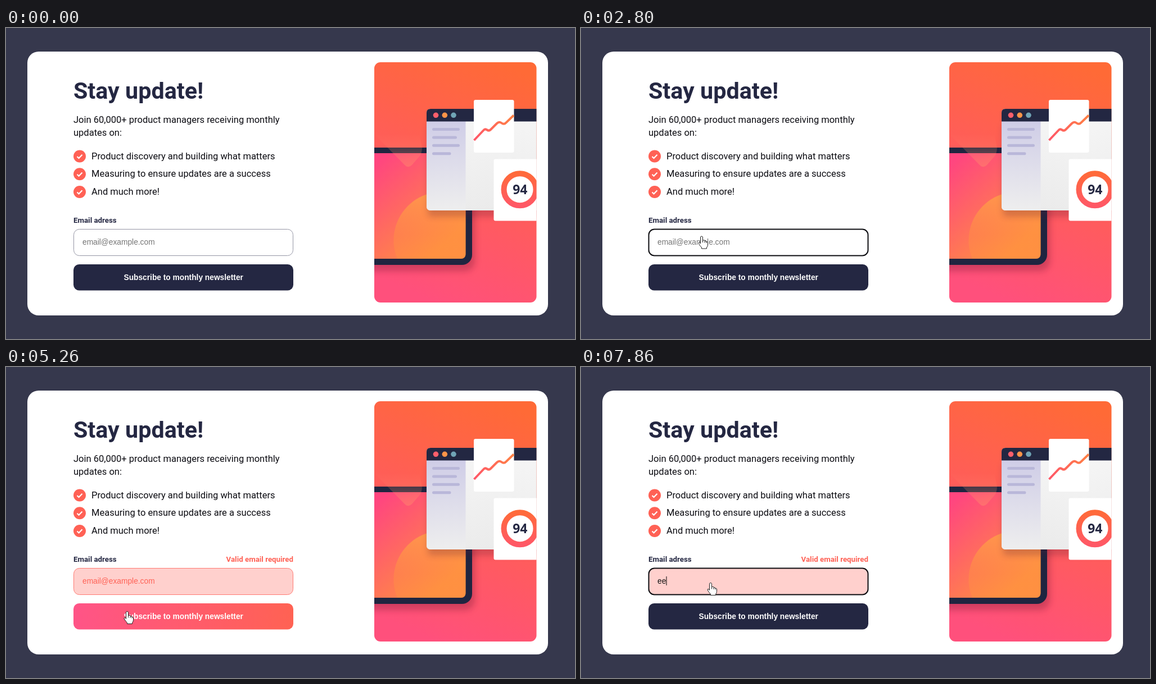
Recreate the animation shown at these times as an HTML page. Size 1012 by 554 pixels, loop 7.99 s.

```html
<!DOCTYPE html>
<html lang="en">
<head>
<meta charset="utf-8">
<title>Newsletter sign-up</title>
<style>
html, body { margin: 0; width: 100%; height: 100%; overflow: hidden; background: #36384d; }
svg { display: block; width: 1012px; height: 554px; }
text { font: 16.5px Roboto, sans-serif; fill: #0c0c12; }
.title { font-size: 41.25px; font-weight: 700; fill: #242742; }
.label { font-size: 13.3px; font-weight: 700; fill: #242742; }
.field { font: 13.75px "Liberation Sans", Arial, sans-serif; }
.button { font: bold 13.75px "Liberation Sans", Arial, sans-serif; fill: #fff; }
.score { font: bold 22.8px "Open Sans", sans-serif; fill: #242742; }
</style>
</head>
<body>
<svg viewBox="0 0 1012 554">
  <defs>
    <linearGradient id="backdrop" gradientUnits="userSpaceOnUse" x1="900" y1="70" x2="720" y2="470">
      <stop stop-color="#ff6a36"/><stop offset="1" stop-color="#ff507c"/>
    </linearGradient>
    <linearGradient id="screen" gradientUnits="userSpaceOnUse" x1="665" y1="235" x2="790" y2="375">
      <stop stop-color="#ff467f"/><stop offset=".5" stop-color="#ff6a60"/><stop offset="1" stop-color="#ff8e42"/>
    </linearGradient>
    <linearGradient id="sun" x1="0" y1="0" x2="0" y2="1">
      <stop stop-color="#ffa048" stop-opacity=".85"/><stop offset=".65" stop-color="#ff9440" stop-opacity=".4"/>
    </linearGradient>
    <linearGradient id="glass" x1="0" y1="0" x2="0" y2="1">
      <stop stop-color="#ff8f6b" stop-opacity="0"/><stop offset="1" stop-color="#ff8f6b" stop-opacity=".45"/>
    </linearGradient>
    <linearGradient id="sidebar" x1="0" y1="0" x2="0" y2="1">
      <stop stop-color="#cfcde7"/><stop offset="1" stop-color="#eeeeee"/>
    </linearGradient>
    <linearGradient id="page" x1="0" y1="0" x2="0" y2="1">
      <stop stop-color="#f6f6f6"/><stop offset="1" stop-color="#ebebeb"/>
    </linearGradient>
    <linearGradient id="ring" x1="0" y1="0" x2="0" y2="1">
      <stop stop-color="#ff6a3a"/><stop offset="1" stop-color="#ff5866"/>
    </linearGradient>
    <linearGradient id="trend">
      <stop stop-color="#ff5768"/><stop offset="1" stop-color="#ff8044"/>
    </linearGradient>
    <linearGradient id="hot">
      <stop stop-color="#ff5487"/><stop offset="1" stop-color="#ff6253"/>
    </linearGradient>
    <filter id="blur" x="-20%" y="-20%" width="140%" height="140%"><feGaussianBlur stdDeviation="6"/></filter>
    <clipPath id="frame"><rect x="655" y="61" width="288.5" height="428" rx="11"/></clipPath>
    <g id="check">
      <circle r="11" fill="#ff6155"/>
      <path d="M-4.5.5L-1.5 3.5 4.5-2.8" fill="none" stroke="#fff" stroke-width="2.2"/>
    </g>
  </defs>

  <rect width="1012" height="554" fill="#36384d"/>
  <rect x="38" y="42" width="926" height="470" rx="20" fill="#fff"/>

  <text class="title" x="120" y="126">Stay update!</text>
  <text x="120" y="169">Join 60,000+ product managers receiving monthly</text>
  <text x="120" y="191.5">updates on:</text>
  <use href="#check" x="131" y="228.5"/>
  <text x="152" y="233.5">Product discovery and building what matters</text>
  <use href="#check" x="131" y="260.3"/>
  <text x="152" y="265">Measuring to ensure updates are a success</text>
  <use href="#check" x="131" y="292"/>
  <text x="152" y="297">And much more!</text>

  <text class="label" x="120" y="346.5">Email adress</text>
  <text class="label" id="error" x="511" y="346.5" text-anchor="end" style="fill:#ff6155">Valid email required</text>
  <rect id="input" x="120.5" y="358.5" width="390" height="47" rx="10"/>
  <text class="field" id="value" x="136" y="386"></text>
  <path id="caret" d="M136.5 373V389" stroke="#000"/>
  <rect id="submit" x="120" y="421" width="391" height="46.5" rx="10"/>
  <text class="button" x="315.7" y="449" text-anchor="middle">Subscribe to monthly newsletter</text>

  <g clip-path="url(#frame)">
    <rect x="655" y="61" width="289" height="428" fill="url(#backdrop)"/>
    <rect x="620" y="230" width="214" height="203" rx="18" fill="#7a1238" opacity=".35" filter="url(#blur)"/>
    <rect x="620" y="213" width="209" height="209" rx="18" fill="#1f2540"/>
    <rect x="620" y="223" width="197.5" height="188" rx="8" fill="url(#screen)"/>
    <path d="M696 411A86 86 0 0 1 817.5 303V403Q817.5 411 809.5 411Z" fill="url(#sun)"/>
    <path d="M655 189L708 243Q715 251 722 244L735 229Q740 223 740 213L735 189Z" fill="url(#glass)"/>
    <rect x="750" y="170" width="240" height="166" rx="7" fill="#5a1430" opacity=".25" filter="url(#blur)"/>
    <rect x="748" y="144" width="220" height="181" rx="7" fill="url(#page)"/>
    <path d="M748 166H817.5V325H755Q748 325 748 318Z" fill="url(#sidebar)"/>
    <path d="M748 166.5V151Q748 144 755 144H944V166.5Z" fill="#232742"/>
    <circle cx="764.5" cy="155.3" r="4.8" fill="#ff5f6b"/>
    <circle cx="780.3" cy="155.3" r="4.8" fill="#ff9448"/>
    <circle cx="796" cy="155.3" r="4.8" fill="#70a4b6"/>
    <path d="M760.5 180.5H804.5M760.5 195H799.5M760.5 209.3H804.5M760.5 223.8H789" stroke="#b9b7d9" stroke-width="5" stroke-linecap="round"/>
    <rect x="832" y="128" width="71.5" height="94" rx="3" fill="#fff"/>
    <path d="M832.5 200L849 182.5Q852 179 855.500 181.500Q859 184 862 181L873 170Q877 166 881 169Q886 173 890 168L903 155.500" fill="none" stroke="url(#trend)" stroke-width="4"/>
    <rect x="867.5" y="233.500" width="90" height="110" rx="3" fill="#fff"/>
    <circle cx="914" cy="287.7" r="28.500" fill="none" stroke="url(#ring)" stroke-width="10"/>
    <text class="score" x="914.3" y="295.500" text-anchor="middle">94</text>
  </g>

  <circle id="click" r="12.5" cx="215.5" cy="435.5" fill="#ff0" opacity=".47"/>
  <g id="cursor">
    <path id="hand" fill="#fff" stroke="#222" d="M-2 2Q-2 0 0 0T2 2V8Q3 6.500 4.500 7Q6 7 6.200 8.500Q8 8 8.500 9.800Q10.500 9 11 11.500V15Q11 18 9 20V22H0V20Q-3 17 -5 13.500Q-6 11 -4.500 10.800Q-3.500 10.600 -2 13ZM2 8V11M5.500 8.500V11.500M8.500 9.800V12"/>
    <path id="beam" fill="none" stroke="#111" stroke-width="1.500" d="M-4-8.500H-1Q0-8.500 0-7.500Q0-8.500 1-8.500H4M0-8V8M-4 8.500H-1Q0 8.500 0 7.500Q0 8.500 1 8.500H4"/>
    <path id="arrow" fill="#fff" stroke="#222" d="M0 0V16L3.700 12.600 6.400 18.600 9 17.500 6.400 11.600H11.500Z"/>
  </g>
</svg>
<script>
const LOOP = 7990, STEP = 70;
const $ = id => document.getElementById(id);
const show = (id, on) => $(id).setAttribute('visibility', on ? 'visible' : 'hidden');
const set = (id, attrs) => { for (const k in attrs) $(id).setAttribute(k, attrs[k]); };

// Pointer path: time, x, y
const path = [
  [1130, 976, 535], [1620, 103, 170], [1830, 166, 88], [1900, 167, 89], [1970, 168, 95],
  [2730, 215, 369], [2800, 214.5, 371], [3659, 214.5, 371], [3660, 214.5, 376],
  [3940, 215.8, 431], [4010, 215.5, 435.5], [6589, 215.5, 435.5], [6590, 217, 428],
  [6660, 219.5, 415], [7140, 230.5, 384.5], [LOOP, 230.5, 384.5]
];

function pointerAt(t) {
  const i = path.findIndex((p, n) => n < path.length - 1 && t < path[n + 1][0]);
  const [t0, x0, y0] = path[i], [t1, x1, y1] = path[i + 1];
  const k = Math.floor((t - t0) / STEP) * STEP / (t1 - t0);
  return [x0 + (x1 - x0) * k, y0 + (y1 - y0) * k];
}

function cursorFor(x, y) {
  if (x < 120 || x > 511) return 'arrow';
  if (y >= 358 && y <= 406 || y >= 421 && y <= 468) return 'hand';
  return y > 80 && y < 352 ? 'beam' : 'arrow';
}

function draw(t) {
  const within = (a, b) => t >= a && t < b;
  const invalid = t >= 5260;
  const active = within(2660, 3870) || t >= 6870;
  const typed = t < 7600 ? '' : t < 7860 ? 'e' : 'ee';

  show('error', invalid);
  set('input', {
    fill: invalid ? '#ffd0cd' : '#fff',
    stroke: active ? '#0c0c10' : invalid ? '#ff7a72' : '#9596a5',
    'stroke-width': active ? 2 : 1
  });
  $('value').textContent = typed || 'email@example.com';
  $('value').style.fill = typed ? '#111' : invalid ? '#ff6155' : '#757575';
  show('caret', t >= 7140);
  set('caret', { transform: `translate(${typed.length * 7.75})` });
  set('submit', { fill: within(4010, 6590) ? 'url(#hot)' : '#242742' });
  show('click', within(5120, 5260));

  const visible = t >= 1130;
  const [x, y] = visible ? pointerAt(t) : [0, 0];
  const kind = cursorFor(x, y);
  for (const id of ['hand', 'beam', 'arrow']) show(id, visible && id === kind);
  set('cursor', { transform: `translate(${x} ${y})` });
}

const start = performance.now();
function tick() {
  draw((performance.now() - start) % LOOP);
  requestAnimationFrame(tick);
}
tick();
</script>
</body>
</html>
```
